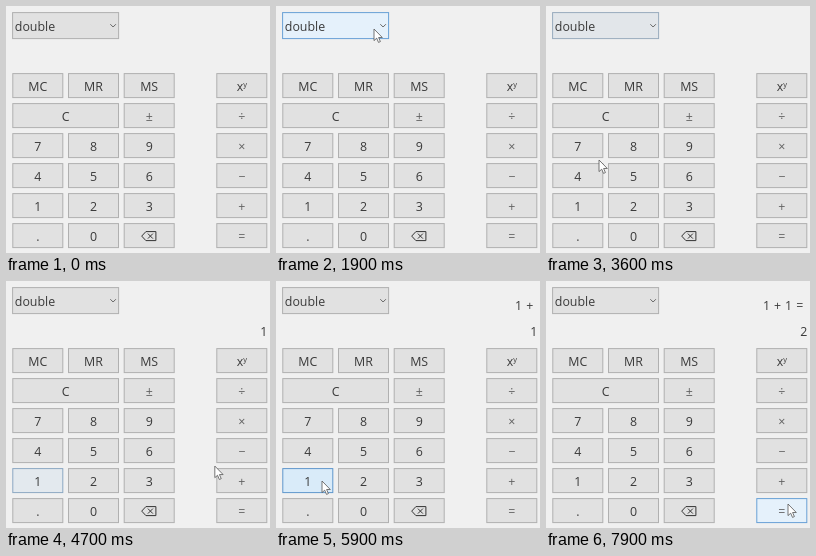
These frames come from a looping animation (264 by 247 pixels, 8000 ms). An HTML page:

```html
<!DOCTYPE html>
<html lang="en">
<head>
<meta charset="utf-8">
<title>Calculator</title>
<style>
  html, body { margin: 0; width: 100%; height: 100%; overflow: hidden; background: #f0f0f0; }
  svg { display: block; width: 264px; height: 247px; }
  text { font: 12.4px "Open Sans", "Noto Sans", sans-serif; fill: #3a3a3a; white-space: pre; }
  .mid { text-anchor: middle; }
  .end { text-anchor: end; }
  .sign { fill: #626262; }
  #history { word-spacing: .8px; }
</style>
</head>
<body>
<svg id="stage" viewBox="0 0 264 247" xmlns="http://www.w3.org/2000/svg">
  <rect width="264" height="247" fill="#f0f0f0"/>
  <g id="keys"></g>
  <text x="8.8" y="24.5">double</text>
  <path d="M104.3 18.2l2.8 2.8 2.8-2.8" fill="none" stroke="#666"/>
  <text id="history" class="end" x="257.3" y="29"></text>
  <text id="value" class="end" x="261.3" y="54.5"></text>
  <path id="cursor" d="M0 0V11.6L2.7 9.2L4.5 13.4L6.4 12.6L4.6 8.5H8.3Z"
        fill="#fff" stroke="#555" stroke-width=".8" stroke-linejoin="round"/>
</svg>
<script>
const NS = 'http://www.w3.org/2000/svg';
const LOOP = 8000, STEP = 100;
const $ = id => document.getElementById(id);
const keys = $('keys');
const boxes = {};

function add(tag, attrs, text = '') {
  const el = document.createElementNS(NS, tag);
  for (const k in attrs) el.setAttribute(k, attrs[k]);
  el.textContent = text;
  return keys.appendChild(el);
}

// Colour ramps: normal, hover, pressed
const FILL = [[225, 225, 225], [229, 241, 251], [204, 228, 247]];
const EDGE = [[176, 176, 176], [104, 160, 214], [86, 142, 194]];

function ramp(list, level) {
  const i = level < 1 ? 0 : 1, f = level - i;
  return `rgb(${list[i].map((c, n) => Math.round(c + (list[i + 1][n] - c) * f))})`;
}

function paint(name, level) {
  boxes[name].setAttribute('fill', ramp(FILL, level));
  boxes[name].setAttribute('stroke', ramp(EDGE, level));
}

function addBox(name, x, y, width, height) {
  boxes[name] = add('rect', { x, y, width, height });
  paint(name, 0);
}

const ROWS = ['MC MR MS x', 'C  ± ÷', '7 8 9 ×', '4 5 6 −', '1 2 3 +', '. 0 del ='];

function addKey(label, x, y) {
  const w = label === 'C' ? 105.7 : 50;
  addBox(label, x, y, w, 24);
  if (label === 'del') {
    add('path', {
      d: `M${x + 17.5} ${y + 12.5}l4.2-4.5h10v9h-10zM${x + 23.7} ${y + 10}l5 5m0-5l-5 5`,
      fill: 'none', stroke: '#333'
    });
    return;
  }
  const sign = /[÷×−+=±]/.test(label) ? ' sign' : '';
  const t = add('text', { x: x + w / 2, y: y + 17.2, class: 'mid' + sign }, label);
  if (label === 'x') t.innerHTML += '<tspan dy="-3.5" font-size="7.5" style="font-size:7.5px">y</tspan>';
}

addBox('type', 6.6, 6.6, 106, 26);
ROWS.forEach((row, r) => row.split(' ').forEach((label, c) => {
  if (label) addKey(label, c < 3 ? 6.8 + c * 55.7 : 210.8, 67.6 + r * 30);
}));

// Pointer stops: arrive, leave, x, y, bend of the way there
const STOPS = [
  [0, 500, 258, 0, 0],
  [1300, 1300, 122, 24, -.44],
  [1700, 3200, 98, 23, 0],
  [4000, 4400, 46, 200, .045],
  [4900, 5300, 240, 198, -.127],
  [5800, 6000, 46, 200, .05],
  [6400, 7000, 241, 232, 0],
  [7700, 7800, 248, 226, 0],
  [7900, LOOP, 242, 223, 0]
];

// Button visits: name, enter, press, release, leave
const VISITS = [
  ['type', 1300, 2300, 2700, 3200],
  ['1', 3900, 4100, 4200, 4400],
  ['+', 4800, 5000, 5100, 5300],
  ['1', 5600, 5800, 5900, 6100],
  ['=', 6300, 6400, 6600, LOOP]
];

// Display contents: time, history, value
const SCREEN = [[0, '', ''], [4200, '', '1'], [5100, '1 +', '1'], [6500, '1 + 1 =', '2']];

const rise = (t, from, span) => Math.max(0, Math.min(1, (t - from) / span));

function pointer(t) {
  const n = STOPS.findIndex(s => t < s[1]);
  const [arrive, , x, y, bend] = STOPS[n];
  if (n === 0) return [x, y];
  const [, leave, x0, y0] = STOPS[n - 1];
  const p = 1 - (1 - rise(t, leave, arrive - leave || 1)) ** 2;
  const dx = x - x0, dy = y - y0, bow = 4 * bend * p * (1 - p);
  return [x0 + dx * p - dy * bow, y0 + dy * p + dx * bow];
}

function glow(name, t) {
  return VISITS.filter(v => v[0] === name).reduce((sum, [, enter, press, release, leave]) =>
    sum + rise(t, enter, 200) - rise(t, leave, 600)
        + rise(t, press, 200) - rise(t, release, 300), 0);
}

function draw(ms) {
  const t = Math.floor((ms % LOOP) / STEP) * STEP;
  for (const [name] of VISITS) paint(name, Math.max(0, Math.min(2, glow(name, t))));
  const [, history, value] = SCREEN.filter(s => s[0] <= t).pop();
  $('history').textContent = history;
  $('value').textContent = value;
  $('cursor').setAttribute('transform', `translate(${pointer(t)})`);
  $('cursor').setAttribute('visibility', t < STOPS[0][1] ? 'hidden' : 'visible');
}

let start;
function tick(now) {
  start ??= now;
  draw(now - start);
  requestAnimationFrame(tick);
}
draw(0);
requestAnimationFrame(tick);
</script>
</body>
</html>
```
